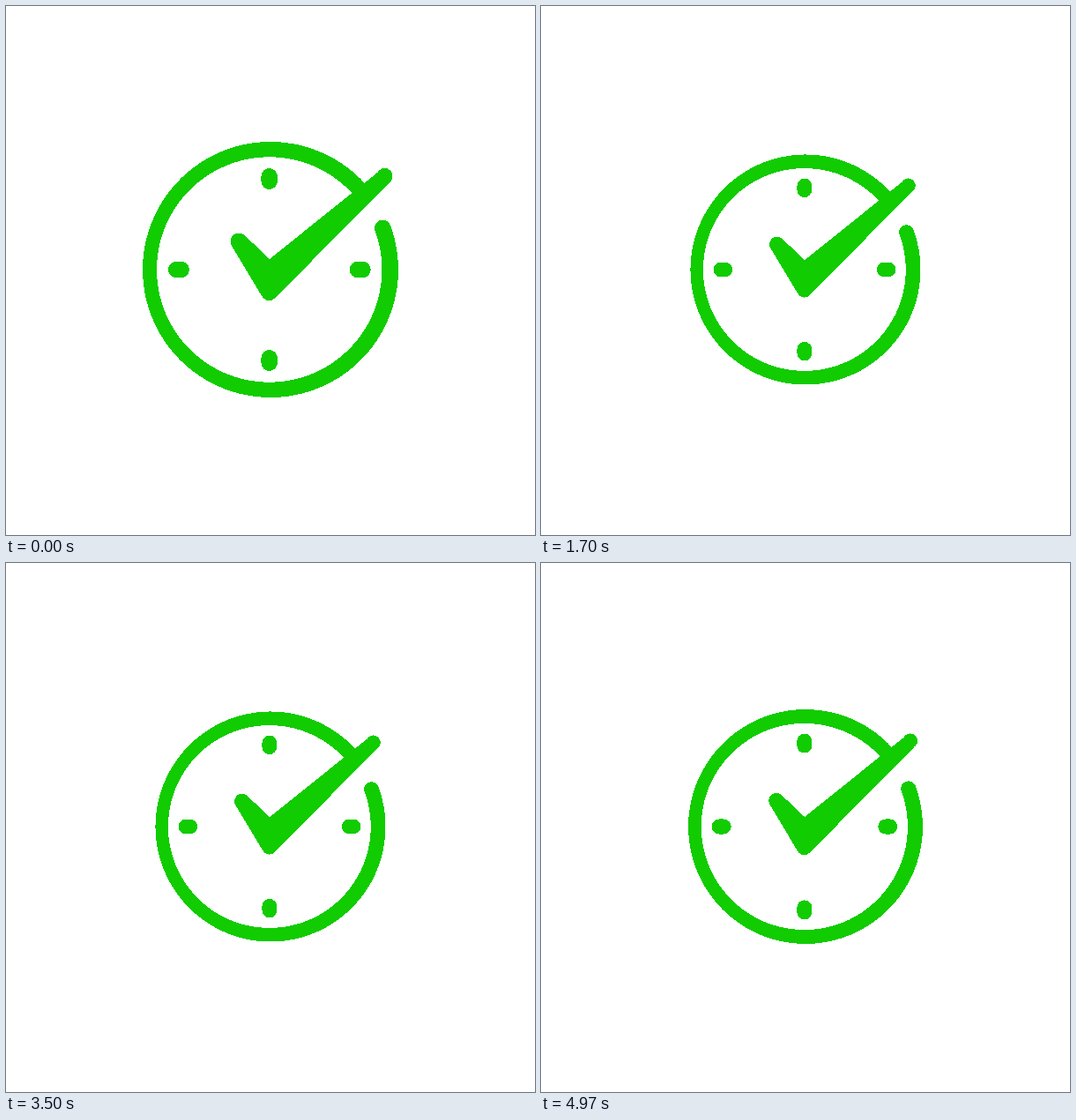
An HTML page for the animation above (5010 ms loop, 600 px wide and 600 px high).

```html
<!DOCTYPE html>
<html>
<head>
<meta charset="utf-8">
<style>
  html, body { margin: 0; width: 100%; height: 100%; overflow: hidden; background: #fff; }
  svg { display: block; width: 100%; height: 100%; }
</style>
</head>
<body>
<svg viewBox="0 0 600 600" shape-rendering="crispEdges">
  <!-- drawn around the centre of the clock -->
  <g id="clock" fill="#11cc00">
    <path id="ring"/>
    <circle cx="127.3" cy="-47" r="9.4"/>
    <path d="M-29.5-39 -1-12 124-112.3 136-100 5.2 32.3 -9.7 30.4 -44.2-27.3Z"/>
    <circle cx="-36" cy="-32" r="9.5"/>
    <circle cx="129.5" cy="-106" r="9.1"/>
    <circle cx="-1.5" cy="25.6" r="9.5"/>
    <path d="M-1.3-105.7v5.4M-1.3 100.3v5.4M-106.7 0h5.4M99 0h5.4"
          stroke="#11cc00" stroke-width="18.6" stroke-linecap="round"/>
  </g>
</svg>
<script>
  const LOOP = 5010, FRAME = 100 / 3, FRAMES = 150;
  const BEAT = 27, RISE = 9, FALL = 18;   // lengths in frames
  const LOW = 0.85, HIGH = 1.15;
  const clock = document.getElementById('clock');

  const polar = (cx, r, deg) => {
    const a = deg * Math.PI / 180;
    return `${cx + r * Math.cos(a)} ${r * Math.sin(a)}`;
  };

  // open ring; the inner edge sits slightly to the left of the outer one
  document.getElementById('ring').setAttribute('d',
    `M${polar(0, 145, -41.8)}A145 145 0 1 0 ${polar(0, 145, -20.2)}` +
    `L${polar(-1.3, 127.7, -20.2)}A127.7 127.7 0 1 1 ${polar(-1.3, 127.7, -41.8)}Z`);

  // steady growth, then a slowing shrink; the loop starts halfway up
  function scaleAt(frame) {
    const p = (frame + RISE / 2) % BEAT;
    const k = p < RISE ? p / RISE : (1 - (p - RISE) / FALL) ** 2;
    return LOW + (HIGH - LOW) * k;
  }

  function draw() {
    const t = performance.now() % LOOP;
    const frame = Math.min(FRAMES - 1, Math.floor((t + 3.4) / FRAME));
    clock.setAttribute('transform', `translate(300 299) scale(${scaleAt(frame)})`);
    requestAnimationFrame(draw);
  }
  draw();
</script>
</body>
</html>
```
